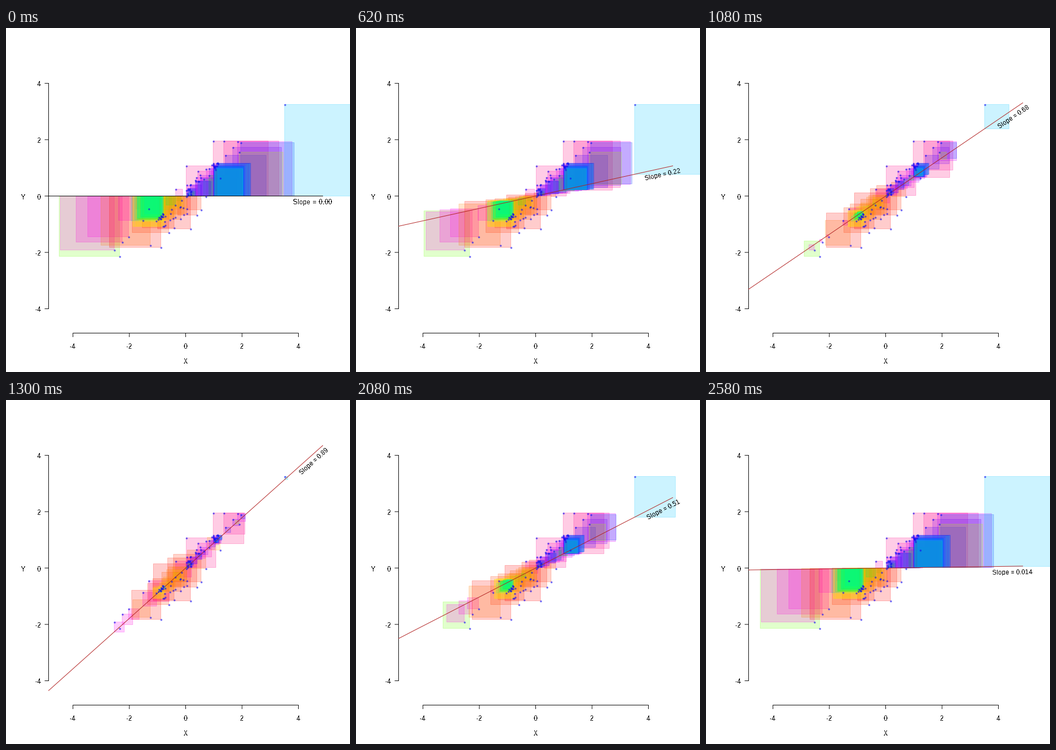
Recreate the animation shown at these times as a matplotlib script. Size 650 px wide and 650 px high, loop 2.6 s.

```python
import math

import matplotlib.pyplot as plt
import numpy as np
from matplotlib.animation import FuncAnimation
from matplotlib.collections import PolyCollection
from matplotlib.colors import hsv_to_rgb

SIZE, DPI = 650, 100
PX = 72 / DPI                      # one pixel in points
X0, Y0, UNIT = 339.5, 317.5, 53.25
LEFT, RIGHT = 80.5, 598.5
BEST, STEP = 0.894, 0.02
FRAMES, HOLD_END, FALL_START = 130, 20, 85

plt.rcParams.update({
    "font.family": "Liberation Sans",
    "font.size": 13 * PX,
    "text.hinting": "native",
    "text.hinting_factor": 1,
    "text.antialiased": False,
    "path.snap": False,
})

# Key observations on the rim of the cloud, in stage pixels.
RIM = [
    (214, 431), (204, 419), (219, 404), (231, 394), (272, 410), (292, 414),
    (307, 386), (317, 377), (348, 379), (360, 353), (368, 343), (258, 363),
    (269, 341), (320, 304), (340, 260), (377, 318), (362, 270), (391, 213),
    (411, 213), (437, 214), (443, 216), (428, 225), (414, 240), (440, 234),
    (404, 283), (526, 144),
]
# Random strands: count, centre x, half width, centre y, tilt, half height
STRANDS = [
    (20, -0.50, 0.55, -0.62, 0.45, 0.35),
    (13, -0.87, 0.10, -0.74, 0.50, 0.10),
    (12, 0.10, 0.10, 0.18, 0.30, 0.25),
    (16, 0.50, 0.45, 0.60, 0.90, 0.18),
    (15, 1.05, 0.10, 1.05, 0.00, 0.13),
]


def px(u):
    return X0 + UNIT * u


def py(v):
    return Y0 - UNIT * v


rng = np.random.default_rng(7)


def strand(n, cx, half_w, cy, tilt, half_h):
    dx = half_w * rng.uniform(-1, 1, n)
    return np.column_stack([cx + dx,
                            cy + tilt * dx + half_h * rng.uniform(-1, 1, n)])


rim = (np.array(RIM) + 0.5 - (X0, Y0)) / (UNIT, -UNIT)
x, y = np.vstack([rim, *(strand(*s) for s in STRANDS)]).T

# Hue follows the rank of the fitted residual.
rank = (y - BEST * x).argsort().argsort()
ones = np.ones(len(x))
rgb = hsv_to_rgb(np.column_stack([rank / len(x) * 0.93, ones, ones]))


def with_alpha(alpha):
    return np.column_stack([rgb, alpha * ones])


def squares(slope):
    """Residual squares, aligned to pixel centres."""
    base = slope * x
    far = x + y - base
    xs = px(np.stack([x, far, far, x], axis=1))
    ys = py(np.stack([base, base, y, y], axis=1))
    return np.floor(np.stack([xs, ys], axis=2) + 1e-6) + 0.5


def slope_at(i):
    if i <= FALL_START:
        return min(max(i - HOLD_END, 0) * STEP, BEST)
    return BEST - (i - FALL_START) * STEP


fig = plt.figure(figsize=(SIZE / DPI, SIZE / DPI), dpi=DPI, facecolor="white")
ax = fig.add_axes([0, 0, 1, 1])
ax.set(xlim=(0, SIZE), ylim=(SIZE, 0))
ax.axis("off")


def stroke(xs, ys, z=1):
    return ax.plot(xs, ys, color="black", lw=PX, zorder=z, snap=False,
                   solid_capstyle="projecting")[0]


def write(tx, ty, text, ha="center"):
    ax.text(tx, ty, text, ha=ha, va="baseline")


x_axis, y_axis = 576.5, 80.5
stroke([px(-4), px(4)], [x_axis, x_axis])
stroke([y_axis, y_axis], [py(-4), py(4)])
for v in range(-4, 5, 2):
    stroke([px(v), px(v)], [x_axis, x_axis + 7])
    stroke([y_axis - 7, y_axis], [py(v), py(v)])
    write(px(v) - 0.5, 605.5, str(v))
    write(66, py(v) + 6, str(v), ha="right")
write(X0, 634, "X")
write(32, 323.5, "Y")

boxes = PolyCollection(squares(0), facecolors=with_alpha(0.2),
                       edgecolors=with_alpha(0.25), linewidths=PX,
                       snap=False, zorder=2)
ax.add_collection(boxes, autolim=False)
line = stroke([LEFT, RIGHT], [Y0, Y0], z=3)
ax.scatter(px(x), py(y), s=(3.7 * PX) ** 2, color=(0.08, 0.05, 0.95, 0.6),
           linewidths=0, snap=False, zorder=4)
label = ax.text(0, 0, "", ha="center", va="center", zorder=5)


def draw(i):
    s = slope_at(i)
    boxes.set_verts(squares(s))
    line.set_ydata([Y0 - s * (LEFT - X0), Y0 - s * (RIGHT - X0)])
    line.set_color("firebrick" if s else "black")
    cx = 578.5 + 4.5 * s
    label.set_position((cx, Y0 - s * (cx - X0) + 12 + 4.5 * s))
    label.set_rotation(math.degrees(math.atan(s)))
    label.set_fontsize((12 if s else 13) * PX)
    label.set_text("Slope = " + (f"{s:#.2g}" if s else "0.00"))
    return boxes, line, label


anim = FuncAnimation(fig, draw, frames=FRAMES, interval=20, repeat=True,
                     repeat_delay=0, blit=False)
plt.show()
```
